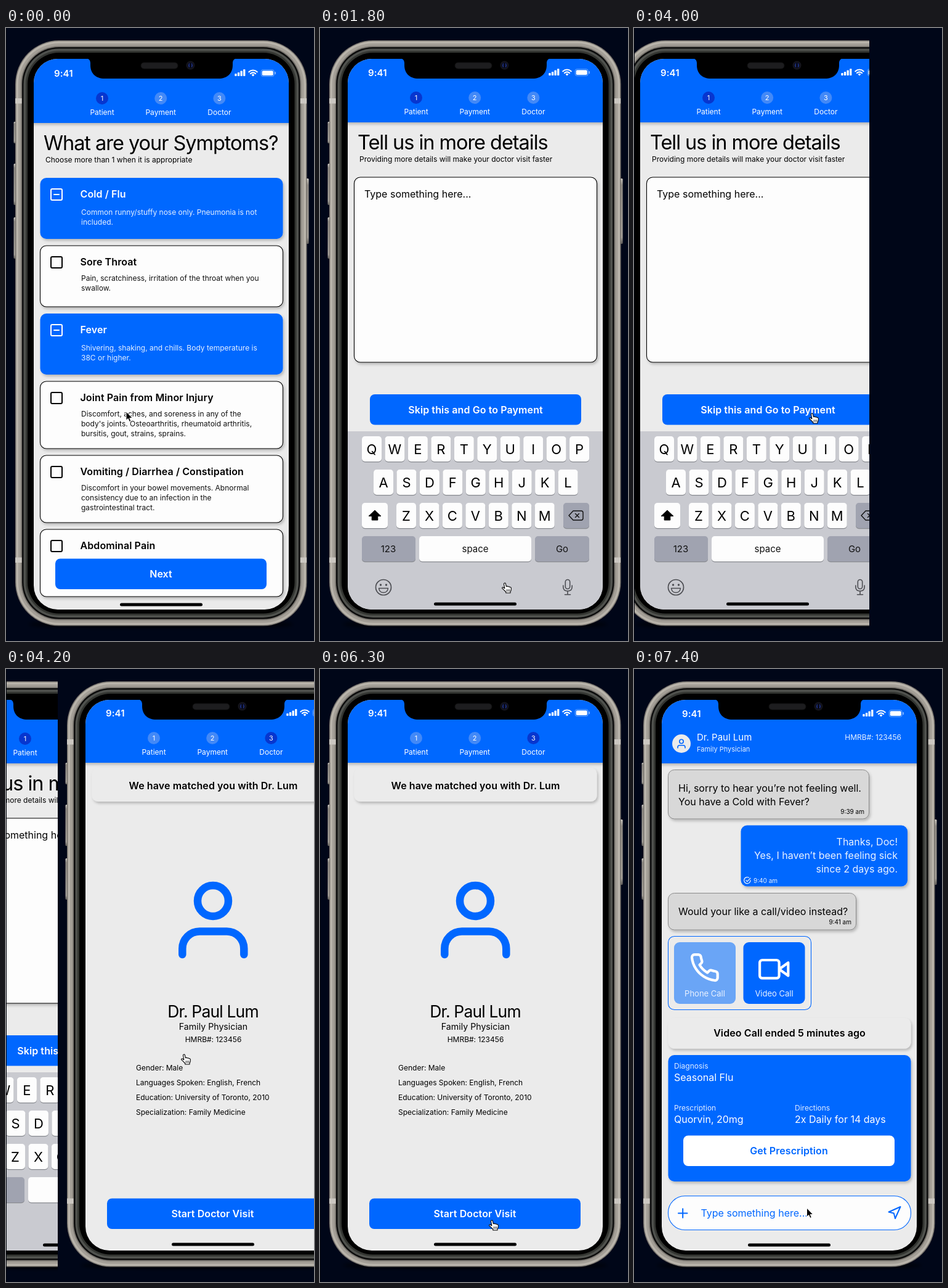
These frames come from a looping animation (500 by 994 pixels, 7.5 s). An HTML page:

```html
<!DOCTYPE html>
<html lang="en">
<head>
<meta charset="utf-8">
<title>Doctor visit prototype</title>
<style>
html, body { margin: 0; width: 100%; height: 100%; overflow: hidden; background: #000618; }
svg { display: block; width: 100%; height: 100%; }
text { font-family: Inter, "Open Sans", sans-serif; font-optical-sizing: none; white-space: pre; }
</style>
</head>
<body>
<svg id="stage" viewBox="0 0 500 994"></svg>
<script>
const LOOP = 7500, STEP = 100, PUSH = 400, WIDTH = 500;
const BLUE = '#0067ff', PAGE = '#ebebeb', WHITE = '#fdfdfd';
const DOCTOR = 'Dr. Paul Lum', LICENCE = 'HMRB#: 123456';

const rect = (x, y, w, h, r, fill, more = '') =>
  `<rect x="${x}" y="${y}" width="${w}" height="${h}" rx="${r}" fill="${fill}" ${more}/>`;
const circle = (x, y, r, fill, more = '') =>
  `<circle cx="${x}" cy="${y}" r="${r}" fill="${fill}" ${more}/>`;
const line = (d, color, width, more = '') =>
  `<path d="${d}" fill="none" stroke="${color}" stroke-width="${width}" stroke-linecap="round" stroke-linejoin="round" ${more}/>`;
const text = (x, y, s, size = 12, fill = '#000', more = '') =>
  `<text x="${x}" y="${y}" font-size="${size}" fill="${fill}" ${more}>${s}</text>`;
const MID = ' text-anchor="middle"', END = ' text-anchor="end"';
const BOLD = ' font-weight="600" letter-spacing=".006em"', TIGHT = ' letter-spacing="-.032em"';
const SHADOW = ' filter="url(#shadow)"';
const lines = (x, y, step, list, size, fill, more) =>
  list.map((s, i) => text(x, y + i * step, s, size, fill, more)).join('');
const button = (x, y, label, fill = BLUE, ink = '#fff') =>
  rect(x, y, 343, 49.5, 8, fill) + text(x + 171.5, y + 30.5, label, 16, ink, MID + BOLD);

const defs = `<defs>
  <clipPath id="screen"><rect x="45" y="50" width="414" height="893" rx="39"/></clipPath>
  <filter id="shadow" x="-10%" y="-20%" width="120%" height="150%">
    <feDropShadow dx="2" dy="3" stdDeviation="2" flood-opacity=".22"/>
  </filter>
  <filter id="soft" x="-10%" y="-100%" width="120%" height="300%"><feGaussianBlur stdDeviation="3"/></filter>
  <linearGradient id="key" x2="0" y2="1">
    <stop offset="0" stop-color="#d0ccc5"/><stop offset=".1" stop-color="#8f8a84"/>
    <stop offset=".9" stop-color="#a5a099"/><stop offset="1" stop-color="#5d5a56"/>
  </linearGradient>
</defs>`;

function phoneBody() {
  const sideKeys = [[12.5, 152, 35], [12.5, 220, 67], [12.5, 307, 67], [485.5, 244, 106]];
  const bands = [15, 477.5].flatMap(x => [114, 858.5].map(y => rect(x, y, 10.5, 8.5, 0, '#cbc7c1')));
  const ring = (inset, color) =>
    rect(15 + inset, 20 + inset, 473.5 - 2 * inset, 949.5 - 2 * inset, 71 - inset, color);
  return `<ellipse cx="252" cy="967" rx="215" ry="5" fill="#000" filter="url(#soft)"/>` +
    sideKeys.map(([x, y, h]) => rect(x, y, 6, h, 1.5, 'url(#key)')).join('') +
    ring(0, '#77736d') + ring(1.5, '#b9b4ab') + ring(5, '#a39e96') + ring(9, '#7d7973') + bands.join('') +
    ring(11, '#0c0c0c') + ring(13.5, '#50524e') + ring(17, '#343632') + ring(20, '#000');
}

function notch() {
  return `<path d="M129 49c5 0 8 3 8 8v3c0 14 9 22 23 22h185c14 0 23-8 23-22v-3c0-5 3-8 8-8z" fill="#000"/>` +
    rect(219, 56, 60, 10, 5, '#1d1d1f', 'stroke="#111"') +
    circle(299.5, 60.5, 7, '#14141c') + circle(299.5, 60.5, 4.5, '#080a1c') +
    line('M297.5 58q-1.5 2.5 0 5M301.5 58q1.5 2.5 0 5', '#23388c', 1.4);
}

function statusBar() {
  const bars = [4, 6, 8.5, 11].map((h, i) => rect(371.3 + i * 4.6, 78 - h, 3.3, h, .8, '#fff')).join('');
  return text(78, 78.5, '9:41', 15, '#fff', BOLD) + bars +
    line('M394.3 71.2a9.7 9.7 0 0 1 13.4 0M396.9 74a5.9 5.9 0 0 1 8.2 0', '#fff', 2.1) +
    '<path d="M401 78.4l-2.4-2.5a3.4 3.4 0 0 1 4.8 0z" fill="#fff"/>' +
    rect(414.2, 67.7, 21, 10.8, 3, 'none', 'stroke="#fff" stroke-opacity=".4"') +
    rect(415.7, 69.2, 18, 7.8, 1.8, '#fff') + rect(436.5, 71, 1.3, 4.2, .6, '#a9ccff');
}

function stepper(active) {
  return ['Patient', 'Payment', 'Doctor'].map((label, i) => {
    const x = 156 + i * 95.2;
    return circle(x, 114, 10, i === active ? '#0736cf' : '#4389f7') +
      text(x, 118, i + 1, 11, '#fff', MID) + text(x, 141, label, 12, '#fff', MID);
  }).join('');
}

// dy nudges the header and the home bar, which sit slightly differently per page.
function page(content, head, dy) {
  return `<rect width="501" height="994" fill="#000618"/><g class="phone">${phoneBody()}
    <g clip-path="url(#screen)">${rect(45, 50, 414, 893, 0, PAGE)}${content}
      <g transform="translate(0 ${dy})">${rect(40, 40, 424, 114, 0, BLUE, SHADOW)}${head}${statusBar()}
      ${rect(185, 932.5, 134, 5, 2.5, '#000')}</g>
    </g>${notch()}</g>`;
}

function symptoms() {
  const cards = [
    [243, 99, 'Cold / Flu', ['Common runny/stuffy nose only. Pneumonia is not', 'included.'], 1],
    [353, 99, 'Sore Throat', ['Pain, scratchiness, irritation of the throat when you', 'swallow.']],
    [463, 99, 'Fever', ['Shivering, shaking, and chills. Body temperature is', '38C or higher.'], 1],
    [573, 109, 'Joint Pain from Minor Injury', ['Discomfort, aches, and soreness in any of the',
      "body's joints. Osteoarthritis, rheumatoid arthritis,", 'bursitis, gout, strains, sprains.']],
    [693, 109, 'Vomiting / Diarrhea / Constipation', ['Discomfort in your bowel movements. Abnormal',
      'consistency due to an infection in the', 'gastrointestinal tract.']],
    [813, 109, 'Abdominal Pain', []]
  ];
  const drawn = cards.map(([y, h, title, info, on]) => {
    const ink = on ? '#fff' : '#000';
    return rect(55.5, y, 394, h, 10, on ? BLUE : WHITE, SHADOW + (on ? '' : ' stroke="#000" stroke-width="1.1"')) +
      rect(73, y + 18, 18, 18, 2, 'none', `stroke="${ink}" stroke-width="2"`) +
      (on ? line(`M78 ${y + 27}h8`, ink, 2) : '') +
      text(120.5, y + 32, title, 16, ink, BOLD) +
      lines(122, y + (on ? 60 : 57), 16, info, 12, on ? '#e4efff' : '#111');
  }).join('');
  return text(61, 197.5, 'What are your Symptoms?', 32.5, '#000', TIGHT) +
    text(64, 218, 'Choose more than 1 when it is appropriate') + drawn + button(80, 860.5, 'Next');
}

function keyboard() {
  const key = (x, y, w, fill = WHITE) => rect(x, y + 1.2, w, 41, 5, '#898b91') + rect(x, y, w, 41, 5, fill);
  const GREY = '#a0a3b0';
  const row = (letters, x, y) => [...letters].map((c, i) => {
    const kx = x + i * 37.45;
    return key(kx - 16, y, 32) + text(kx, y + 29, c, 22, '#000', MID);
  }).join('');
  return rect(45, 654, 414, 290, 0, '#c9cad0') +
    row('QWERTYUIOP', 84, 662) + row('ASDFGHJKL', 103, 716) + row('ZXCVBNM', 140, 770) +
    key(68, 770, 42) + '<path d="M89 782l10 9.5h-5.2v6.5h-9.6v-6.5H79z" fill="#000" stroke="#000" stroke-linejoin="round"/>' +
    key(395, 770, 42, GREY) + line('M411 783h13q3 0 3 3v9q0 3-3 3h-13l-7-7.5z', '#111', 1.4) +
    line('M414.5 787.5l6 6m0-6l-6 6', '#111', 1.4) +
    key(68, 824, 87, GREY) + key(161, 824, 182) + key(349, 824, 88, GREY) +
    [[111, '123'], [252, 'space'], [393, 'Go']].map(([x, s]) => text(x, 850, s, 15, '#111', MID)).join('') +
    circle(103, 907, 12.5, 'none', 'stroke="#4c4d52" stroke-width="1.7"') +
    circle(98.5, 903, 1.7, '#4c4d52') + circle(107.5, 903, 1.7, '#4c4d52') +
    line('M95.5 908.5h15q-1 7-7.5 7t-7.5-7z', '#4c4d52', 1.5) +
    rect(398.3, 894.5, 7.4, 15, 3.7, 'none', 'stroke="#4c4d52" stroke-width="1.6"') +
    line('M394.8 904v2q0 7 7.2 7t7.2-7v-2M402 913v5.5M397.5 918.7h9', '#4c4d52', 1.6);
}

function details() {
  return text(61, 196.5, 'Tell us in more details', 32.5, '#000', TIGHT) +
    text(64, 217, 'Providing more details will make your doctor visit faster') +
    rect(55.5, 242, 394, 300, 10, WHITE, SHADOW + ' stroke="#000" stroke-width="1.1"') +
    text(72, 275, 'Type something here...', 16) +
    button(81, 594, 'Skip this and Go to Payment') + keyboard();
}

function match() {
  const facts = ['Gender: Male', 'Languages Spoken: English, French',
    'Education: University of Toronto, 2010', 'Specialization: Family Medicine'];
  return rect(55.5, 160, 394, 55, 10, PAGE, SHADOW) +
    text(252.5, 195, 'We have matched you with Dr. Lum', 16, '#000', MID + BOLD) +
    circle(252, 376, 25, 'none', `stroke="${BLUE}" stroke-width="12.5"`) +
    line('M202.3 463v-9.5a28 28 0 0 1 28-28h44a28 28 0 0 1 28 28v9.5', BLUE, 12.5) +
    text(252, 564.5, DOCTOR, 26.5, '#000', MID + TIGHT) +
    text(252.5, 584.5, 'Family Physician', 14.2, '#000', MID) +
    text(252.5, 605, LICENCE, 12, '#000', MID) +
    lines(127, 651, 24, facts) + button(80, 858.5, 'Start Doctor Visit');
}

function chatHead() {
  return circle(77, 122, 15, PAGE) + circle(77, 118.5, 3.2, 'none', `stroke="${BLUE}" stroke-width="1.6"`) +
    line('M71 129v-1.2q0-3 3-3h6q3 0 3 3v1.2', BLUE, 1.6) +
    text(102, 117, DOCTOR, 15, '#fff') + text(102, 135, 'Family Physician', 11, '#e6f0ff') +
    text(434, 116, LICENCE, 12, '#e6f0ff', END);
}

function chat() {
  const grey = (y, w, h) => rect(55.5, y, w, h, 10, '#d8d8d8', SHADOW + ' stroke="#8b8b8b"');
  const handset = 'M22 16.92v3a2 2 0 0 1-2.18 2 19.79 19.79 0 0 1-8.63-3.07 19.5 19.5 0 0 1-6-6 19.79 19.79 0 0 1-3.07-8.67A2 2 0 0 1 4.11 2h3a2 2 0 0 1 2 1.72c.13.96.36 1.9.7 2.81a2 2 0 0 1-.45 2.11L8.09 9.91a16 16 0 0 0 6 6l1.27-1.27a2 2 0 0 1 2.11-.45c.91.34 1.85.57 2.81.7A2 2 0 0 1 22 16.92z';
  const camera = 'M3 5h11a2 2 0 0 1 2 2v10a2 2 0 0 1-2 2H3a2 2 0 0 1-2-2V7a2 2 0 0 1 2-2zM23 7l-7 5 7 5z';
  const tile = (x, fill, label, icon, dy) => rect(x, 443, 100, 100, 9, fill) +
    line(icon, '#fff', 2, `transform="translate(${x + 24.5} ${459 + dy}) scale(2.1)"`) +
    text(x + 50, 530.5, label, 13, '#eaf2ff', MID);
  const field = (x, y, label, value) => text(x, y, label, 12, '#e0ecff') + text(x, y + 20, value, 16, '#fff');
  return grey(163.5, 326, 79.5) +
    lines(72, 199, 22, ['Hi, sorry to hear you’re not feeling well.', 'You have a Cold with Fever?'], 16) +
    text(374, 235, '9:39 am', 10, '#000', END) +
    rect(173.5, 253.5, 270.5, 99, 10, BLUE, SHADOW) +
    lines(428, 286, 22, ['Thanks, Doc!', 'Yes, I haven’t been feeling sick', 'since 2 days ago.'], 16, '#eaf2ff', END) +
    line('M189 342.5a5.2 5.2 0 1 1-2.6-4.3M181.8 342.6l2 2 5.2-5.4', '#fff', 1.2) +
    text(194, 347, '9:40 am', 10, '#eaf2ff') +
    grey(363.5, 305, 59.5) + text(72, 399, 'Would your like a call/video instead?', 16) +
    text(353, 414, '9:41 am', 10, '#000', END) +
    rect(55.5, 433.5, 232, 119, 10, 'none', `stroke="${BLUE}" stroke-width="1.1"`) +
    tile(65, '#6aa5f6', 'Phone Call', handset, 0) + tile(177.5, BLUE, 'Video Call', camera, 2.5) +
    rect(55.5, 566, 394, 49.5, 10, PAGE, SHADOW) +
    text(252.5, 595.5, 'Video Call ended 5 minutes ago', 16, '#000', MID + BOLD) +
    rect(55.5, 626, 394, 205, 10, BLUE, SHADOW) +
    field(65, 648, 'Diagnosis', 'Seasonal Flu') + field(65, 716, 'Prescription', 'Quorvin, 20mg') +
    field(261, 716, 'Directions', '2x Daily for 14 days') +
    button(80, 756.5, 'Get Prescription', '#fff', BLUE) +
    rect(55.5, 854.5, 394, 55, 27, WHITE, `stroke="${BLUE}" stroke-width="1.1"`) +
    line('M72 882.5h14.5M79.2 875.2v14.5', BLUE, 2) +
    text(108.5, 887.5, 'Type something here...', 16, BLUE) +
    line('M413.5 880.5l19-8.5-8.5 19-2.2-8.5z', BLUE, 2);
}

const pages = [
  page(symptoms(), stepper(0), 0),
  page(details(), stepper(0), -1),
  page(match(), stepper(2), -2),
  page(chat(), chatHead(), -1)
];
const arrow = `<g class="cursor"><path d="M0 0v14.3l3.2-3 2.2 5.1 2.4-1-2.1-4.9h4.5z" fill="#000" stroke="#fff" stroke-width="1" stroke-linejoin="round"/></g>`;
const hand = `<g class="cursor"><path d="M-1.5 1.3C-1.4-.4 1-.6 1.4 1.1L2.4 5.6C3.4 4.8 4.9 5 5.3 6 6.3 5.4 7.6 5.8 8 6.8 9.2 6.3 10.4 7 10.4 8.4L10.2 11.5 9 14.2V16H1.8V14.5L-1.5 11.2-4.2 8.6C-4.9 7.4-3.4 6.4-2.3 7.2L-.2 8.7Z" fill="#fff" stroke="#000" stroke-width="1.1" stroke-linejoin="round"/>${line('M3.2 10.5v3M5.4 10.5v3M7.6 10.5v3', '#000', .8)}</g>`;

const stage = document.getElementById('stage');
stage.innerHTML = defs + pages.map(p => `<g class="page">${p}</g>`).join('') +
  '<rect width="1" height="994" fill="#00030c"/>' + arrow + hand;
const panes = [...stage.querySelectorAll('.page')];
const cursors = [...stage.querySelectorAll('.cursor')];

const pushes = [1344, 3942, 6336];
// time, x, y, cursor shape (0 arrow, 1 hand)
const track = [
  [0, 195, 622, 0], [900, 288, 862, 1], [1300, 300, 900, 1], [2400, 300, 900, 1],
  [2500, 299, 880, 0], [3200, 289, 649, 0], [3300, 289, 640, 1], [3700, 289, 625, 1],
  [4600, 289, 625, 1], [4700, 289, 645, 0], [5100, 286.5, 775.5, 0], [5500, 281, 862, 1],
  [5800, 279, 894, 1], [7100, 279, 894, 1], [7200, 280, 886, 0], [7400, 280.5, 874, 0]
];

const clamp = v => Math.max(0, Math.min(1, v));
const pushed = (i, t) => i < 0 ? 1 : i >= pushes.length ? 0 : 1 - (1 - clamp((t - pushes[i]) / PUSH)) ** 1.72;

function drawPages(t) {
  panes.forEach((pane, i) => {
    const enter = pushed(i - 1, t), leave = pushed(i, t);
    pane.style.display = enter > 0 && leave < 1 ? '' : 'none';
    pane.setAttribute('transform', `translate(${Math.round(WIDTH * (1 - enter) - WIDTH * .3 * leave)} 0)`);
    // An entering page is still blank at the start of its push.
    pane.querySelector('.phone').style.display = enter > .3 ? '' : 'none';
  });
}

function drawCursor(t) {
  let i = track.length - 1;
  while (track[i][0] > t) i--;
  const a = track[i], b = track[i + 1] || a;
  const k = b === a ? 0 : (t - a[0]) / (b[0] - a[0]);
  const x = a[1] + (b[1] - a[1]) * k, y = a[2] + (b[2] - a[2]) * k;
  cursors.forEach((c, shape) => {
    c.style.display = shape === a[3] ? '' : 'none';
    c.setAttribute('transform', `translate(${x} ${y})`);
  });
}

const start = performance.now();
function tick() {
  const t = Math.floor((performance.now() - start) % LOOP / STEP) * STEP;
  drawPages(t);
  drawCursor(t);
  requestAnimationFrame(tick);
}
tick();
</script>
</body>
</html>
```
